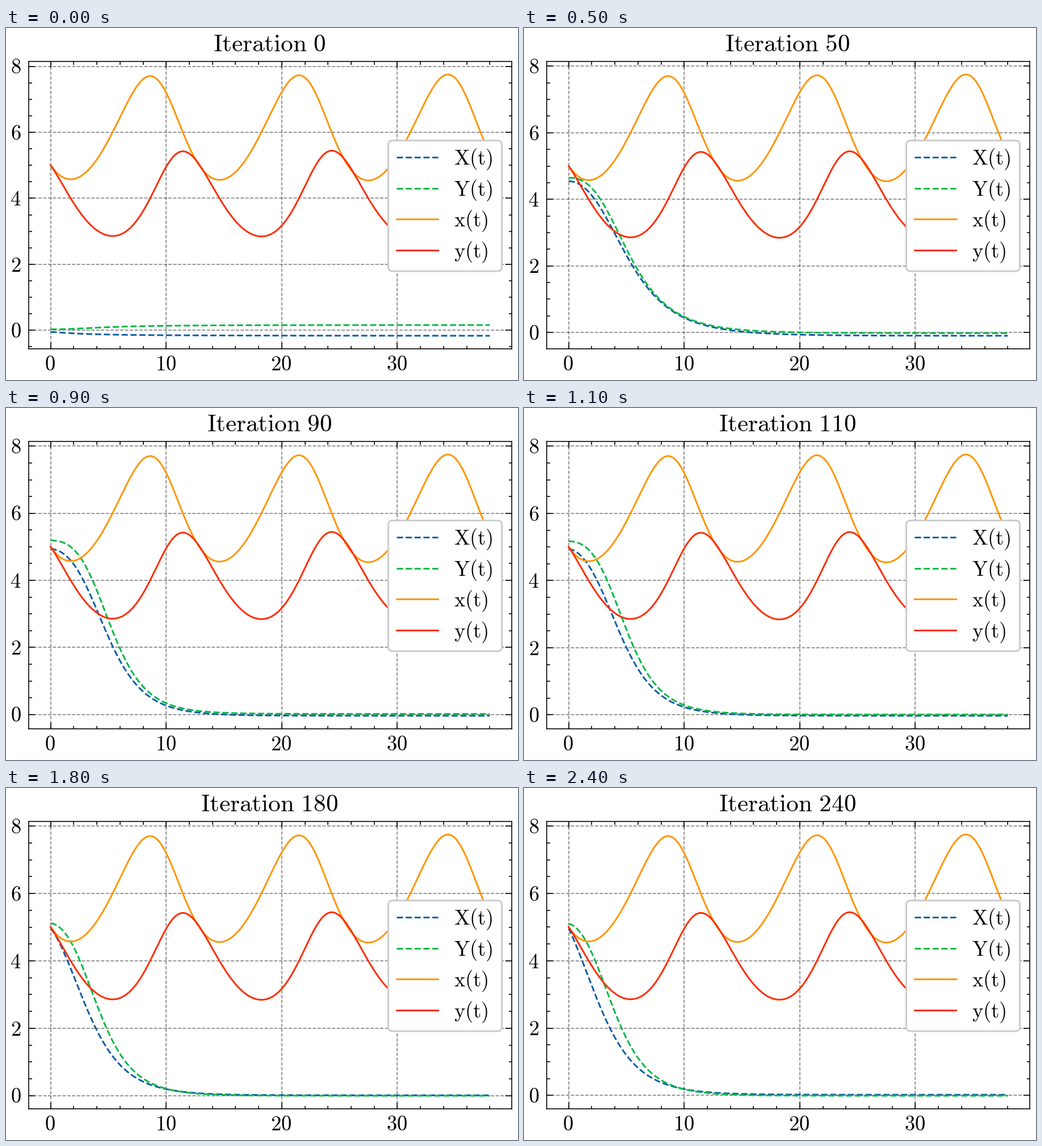
A matplotlib script for the animation above (2500 ms loop, 902 by 621 pixels).

```python
import numpy as np
import matplotlib.pyplot as plt
from matplotlib.animation import FuncAnimation
from matplotlib.patches import FancyBboxPatch
from matplotlib.ticker import MultipleLocator

W, H, DPI = 902, 621, 256
PX = 72 / DPI                                # points per pixel
LEFT, RIGHT, TOP, BOTTOM = 40, 891, 59, 566
T_END, STEP = 38, 10
BLUE, GREEN, ORANGE, RED = "#0C5DA5", "#00B945", "#FF9500", "#FF2C00"
LINE, THIN = 2.95 * PX, 1.6 * PX
BODY, HEAD = 36.6 * PX, 43.2 * PX

plt.rcParams["mathtext.fontset"] = "cm"


def predator_prey(dt=0.008, pace=1.003):
    """Lotka-Volterra orbit from (5, 5) by explicit Euler steps."""
    n = round(T_END * pace / dt)
    path = np.empty((n + 1, 2))
    x, y = path[0] = 5.0, 5.0
    for i in range(1, n + 1):
        x, y = x + dt * x * (0.4 - 0.1 * y), y + dt * y * (0.1 * x - 0.6)
        path[i] = x, y
    return np.linspace(0, T_END, n + 1), path


# Training passes through four milestones, slowing down towards each
MILESTONES = (0, 20, 70, 240)
T_FIT = np.linspace(0, T_END, 300)


def milestone(k):
    pos = np.interp(k, MILESTONES, range(4))
    i = int(pos)
    u = pos - i
    return i + (u if i == 0 else np.sin(np.pi / 2 * u))


def fitted(k, start, half, tail, steep):
    """Sigmoid in t, falling from start to tail with its midpoint at half."""
    a, w, c = (np.interp(milestone(k), range(4), key)
               for key in (start, half, tail))
    settled = 1 - np.exp(-(k / 55) ** 3)
    n = steep * w + 0.3 * (1 - settled)
    odds = (T_FIT / w) ** n * np.exp(0.3 * settled * (T_FIT - w))
    return c + (a - c) / (1 + odds)


FIT_X = dict(start=(-0.05, 2.90, 4.93, 4.97), half=(3, 4.75, 5.25, 2.9),
             tail=(-0.17, -0.33, -0.05, 0.02), steep=0.34)
FIT_Y = dict(start=(0.03, 2.27, 5.21, 5.10), half=(5, 4.3, 5.52, 3.92),
             tail=(0.16, -0.24, 0.025, -0.01), steep=0.385)


def roman(text):
    return r"$\mathrm{%s}$" % text.replace(" ", r"\ ")


fig = plt.figure(figsize=(W / DPI, H / DPI), dpi=DPI, facecolor="white")
ax = fig.add_axes([LEFT / W, 1 - BOTTOM / H,
                   (RIGHT - LEFT) / W, (BOTTOM - TOP) / H])
ax.set_xlim(-0.05 * T_END, 1.05 * T_END)
ax.set_axisbelow(True)
ax.grid(True, color="k", alpha=0.5, ls="--", lw=THIN)
for axis, major, minor in ((ax.xaxis, 10, 2), (ax.yaxis, 2, 0.5)):
    axis.set_major_locator(MultipleLocator(major))
    axis.set_minor_locator(MultipleLocator(minor))
for which, length in (("major", 11), ("minor", 5.5)):
    ax.tick_params(which=which, direction="in", top=True, right=True,
                   length=length * PX, width=THIN,
                   labelbottom=False, labelleft=False)
for spine in ax.spines.values():
    spine.set_linewidth(THIN)

# Overlay in pixel coordinates for text and legend
stage = fig.add_axes([0, 0, 1, 1], zorder=5)
stage.set_xlim(0, W)
stage.set_ylim(H, 0)
stage.axis("off")


def label(x, y, text, size=BODY, ha="center"):
    return stage.text(x, y, roman(text), size=size, ha=ha, va="baseline")


t, orbit = predator_prey()
fit_x, = ax.plot([], [], "--", color=BLUE, lw=LINE)
fit_y, = ax.plot([], [], "--", color=GREEN, lw=LINE)
ax.plot(t, orbit[:, 0], color=ORANGE, lw=LINE)
ax.plot(t, orbit[:, 1], color=RED, lw=LINE)
peak = orbit.max()

title = label(464, 41, "", HEAD)
for v in (0, 10, 20, 30):
    label(LEFT - 1 + (RIGHT - LEFT) * (v / T_END + 0.05) / 1.1, 603.5, str(v))
y_labels = {v: label(26.3, 0, str(v), ha="right") for v in (0, 2, 4, 6, 8)}

stage.add_patch(FancyBboxPatch(
    (673.5, 198.5), 200, 230.5, boxstyle="round,pad=0,rounding_size=7.3",
    fc="white", ec="0.8", lw=LINE))
entries = (("X(t)", BLUE, "--"), ("Y(t)", GREEN, "--"),
           ("x(t)", ORANGE, "-"), ("y(t)", RED, "-"))
for row, (name, color, style) in enumerate(entries):
    y = 228 + 54.7 * row
    stage.plot([688, 761.3], [y, y], style, color=color, lw=LINE)
    label(788.7, y + 13, name, ha="left")


def update(frame):
    k = frame * STEP
    x, y = fitted(k, **FIT_X), fitted(k, **FIT_Y)
    fit_x.set_data(T_FIT, x)
    fit_y.set_data(T_FIT, y)
    low = min(x.min(), y.min())
    margin = 0.05 * (peak - low)
    bottom, top = low - margin, peak + margin
    ax.set_ylim(bottom, top)
    for v, text in y_labels.items():
        text.set_y(BOTTOM - (BOTTOM - TOP) * (v - bottom) / (top - bottom) + 12.7)
    title.set_text(roman(f"Iteration {k}"))
    return fit_x, fit_y, title


anim = FuncAnimation(fig, update, frames=25, interval=100, repeat=True,
                     repeat_delay=0, blit=False)
plt.show()
```
